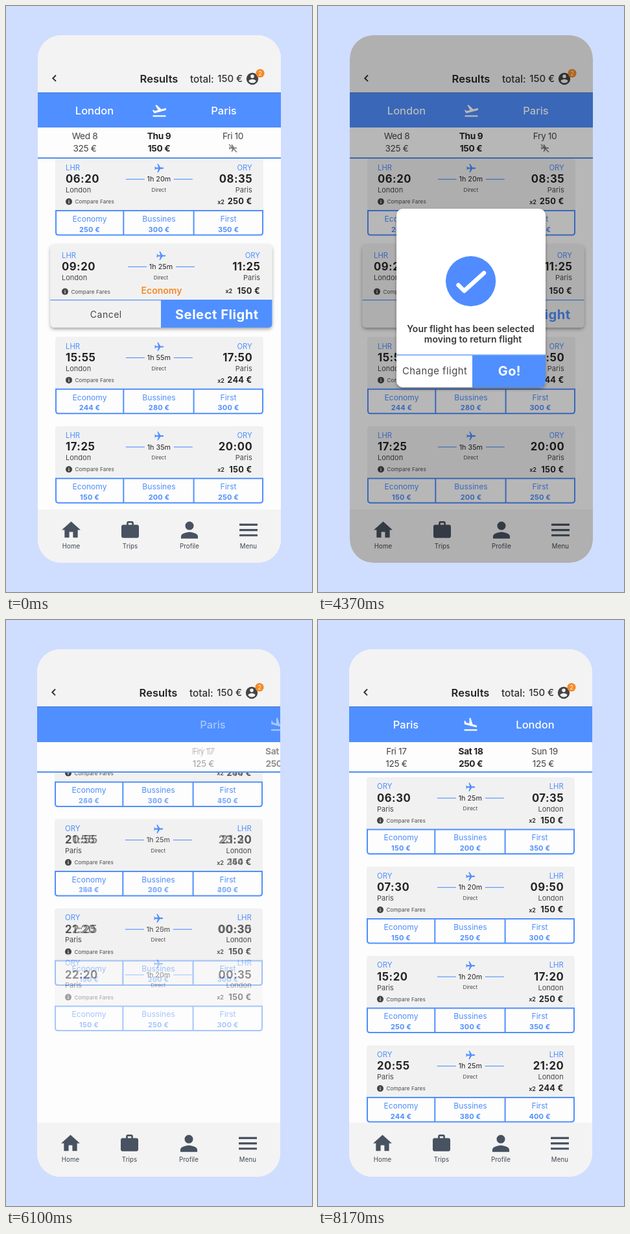
An HTML page for the animation above (8.63 s loop, 472 px wide and 902 px high).

```html
<!DOCTYPE html>
<html lang="en">
<head>
<meta charset="utf-8">
<title>Flight results</title>
<style>
  html, body { margin: 0; width: 100%; height: 100%; overflow: hidden; background: #cfddff; }
  svg { display: block; width: 100vw; height: 100vh; font-family: Inter, "Open Sans", sans-serif; }
  text { white-space: pre; }
</style>
</head>
<body>
<svg id="stage" viewBox="0 0 472 902" xmlns="http://www.w3.org/2000/svg"></svg>
<script>
const LOOP = 8630;
const BLUE = '#508fff', INK = '#242424', GREY = '#484848', ORANGE = '#f58a27', SLATE = '#485260';
const PANEL = '#f3f3f3', CARD = '#f1f1f1', PAPER = '#fdfdfd';

const ICON = {
  home: 'M10 20v-6h4v6h5v-8h3L12 3 2 12h3v8z',
  bag: 'M20 6h-4V4c0-1.11-.89-2-2-2h-4c-1.11 0-2 .89-2 2v2H4c-1.11 0-2 .89-2 2v11c0 1.11.89 2 2 2h16c1.11 0 2-.89 2-2V8c0-1.11-.89-2-2-2zm-6 0h-4V4h4v2z',
  person: 'M12 12a4 4 0 1 0 0-8 4 4 0 0 0 0 8zm0 2c-2.67 0-8 1.34-8 4v2h16v-2c0-2.66-5.33-4-8-4z',
  menu: 'M3 18.3h18v-2H3zm0-5.3h18v-2H3zm0-7.3v2h18v-2z',
  account: 'M12 2a10 10 0 1 0 0 20 10 10 0 0 0 0-20zm0 3a3 3 0 1 1 0 6 3 3 0 0 1 0-6zm0 14.2c-2.5 0-4.71-1.28-6-3.22.03-1.99 4-3.08 6-3.08s5.97 1.09 6 3.08c-1.29 1.94-3.5 3.22-6 3.22z',
  plane: 'M21 16v-2l-8-5V3.5a1.5 1.5 0 0 0-3 0V9l-8 5v2l8-2.5V19l-2 1.5V22l3.5-1 3.5 1v-1.5L13 19v-5.5z',
  takeoff: 'M2.5 19h19v2h-19zm19.57-9.36c-.21-.8-1.04-1.28-1.84-1.06L14.92 10l-6.9-6.43-1.93.51 4.14 7.17-4.97 1.33-1.97-1.54-1.45.39 2.59 4.49 1.6-.43L21 11.49c.81-.23 1.28-1.05 1.07-1.85z',
  landing: 'M2.5 19h19v2h-19zm7.18-5.73l9.66 2.58c.8.21 1.62-.26 1.84-1.06.21-.8-.26-1.62-1.06-1.84l-5.31-1.42-2.76-9.02L10.12 2v8.28L5.15 8.95l-.93-2.32-1.45-.39v5.17z'
};

// Text centred vertically on its capitals.
const text = (s, x, y, size, { a = 'start', w = 400, c = INK, ls = 0 } = {}) =>
  `<text x="${x}" y="${y + size * 0.364}" font-size="${size}" font-weight="${w}" fill="${c}" text-anchor="${a}" letter-spacing="${ls}">${s}</text>`;
const mid = (s, x, y, size, opt) => text(s, x, y, size, { ...opt, a: 'middle' });
const end = (s, x, y, size, opt) => text(s, x, y, size, { ...opt, a: 'end' });
const rect = (x, y, w, h, fill, more = '') => `<rect x="${x}" y="${y}" width="${w}" height="${h}" fill="${fill}" ${more}/>`;
const icon = (name, x, y, scale, fill, turn = 0) =>
  `<path d="${ICON[name]}" fill="${fill}" transform="translate(${x} ${y}) rotate(${turn}) scale(${scale}) translate(-12 -12)"/>`;
const group = (body, more = '') => `<g ${more}>${body}</g>`;

// A flight is [departure, arrival, duration, economy, business, first].
const HOME = ['LHR', 'London'], AWAY = ['ORY', 'Paris'];

function times([dep, arr, dur, price], left, right, low) {
  return text(dep, left, 31.5, 16.7, { w: 700, ls: .5 }) +
    end(arr, right + .5, 31.5, 16.7, { w: 700, ls: .5 }) +
    mid(dur, (left + right) / 2, 32, 10.8) +
    end(`${price} €`, right, low, 12.8, { w: 700, ls: .3 }) +
    text('x2', right - 53.5, low + .8, 9, { w: 600 });
}

function route(from, to, left, right, low) {
  const c = (left + right) / 2;
  return text(from[0], left, 14.3, 11.3, { c: BLUE }) +
    end(to[0], right, 14.3, 11.3, { c: BLUE }) +
    text(from[1], left, 48.5, 11, { c: GREY }) +
    end(to[1], right, 48.5, 11, { c: GREY }) +
    icon('plane', c + .3, 15.5, .7, BLUE, 90) +
    rect(c - 51, 31.6, 29, 1.1, BLUE) + rect(c + 23, 31.6, 29, 1.1, BLUE) +
    mid('Direct', c, 48.3, 8, { c: GREY }) +
    `<circle cx="${left + 5}" cy="${low + .6}" r="5" fill="#444"/>` +
    rect(left + 4.4, low, 1.2, 3.2, CARD) + rect(left + 4.4, low - 2, 1.2, 1.2, CARD) +
    text('Compare Fares', left + 14.5, low + .6, 8.2, { c: GREY, ls: .1 });
}

const fares = f => [128, 235, 342].map((x, i) =>
  mid(`${f[3 + i]} €`, x, 109, 11, { w: 700, c: BLUE, ls: .15 })).join('');

function card(y, from, to, flight, old, id = '') {
  const L = 91, R = 378.7;
  const values = f => times(f, L, R, 66.3) + fares(f);
  const names = ['Economy', 'Bussines', 'First'];
  return group(
    `<path d="M75 80V4q0-4 4-4H392q4 0 4 4V80z" fill="${CARD}"/>` + route(from, to, L, R, 66) +
    `<path d="M76 80.5H395V114q0 4-4 4H80q-4 0-4-4zM180.3 80.5V118M288.6 80.5V118" fill="${PAPER}" stroke="${BLUE}" stroke-width="2"/>` +
    names.map((n, i) => mid(n, [128, 235, 342][i], 93, 12.1, { c: BLUE })).join('') +
    (old ? group(values(old), 'class="old"') + group(values(flight), 'class="new"') : values(flight)),
    `${id} transform="translate(0 ${y})"`);
}

function selected(pressed) {
  return group(
    rect(67.5, 367, 342, 128, CARD, 'rx="6" filter="url(#shadow)"') +
    group(route(HOME, AWAY, 85, 391, 69.7) + times(['09:20', '11:25', '1h 25m', '150'], 85, 391, 69), 'transform="translate(0 369.3)"') +
    mid('Economy', 239, 437.8, 14, { w: 600, c: ORANGE }) +
    (pressed ? '' : `<path d="M238 453H409.5V489q0 6-6 6H238z" fill="${BLUE}"/>`) +
    rect(67.5, 452, 342, 1.2, BLUE) +
    mid('Cancel', 153.3, 475, 14, { c: GREY, ls: .5 }) +
    mid('Select Flight', 324.3, 475, 20.2, { w: 700, c: pressed ? BLUE : '#fff', ls: .5 }));
}

// Bars shared by both screens; edge and navY place the strips that differ.
function frame(list, strip, edge, navY) {
  const nav = [['home', 'Home', 1.45, 99.5], ['bag', 'Trips', 1.35, 190.5], ['person', 'Profile', 1.63, 282], ['menu', 'Menu', 1.55, 373]];
  return group(
    rect(48, 45, 375, 812, PAPER) +
    group(list, 'clip-path="url(#list)"') +
    rect(48, 45, 375, 89, PANEL) +
    `<path d="M76 106.5l-4.7 4.7 4.7 4.7" fill="none" stroke="#333" stroke-width="2"/>` +
    mid('Results', 235, 111.5, 16.5, { w: 600 }) +
    text('total:', 283, 112, 15.3, { w: 500, c: '#333' }) + text('150 €', 325.3, 112, 14.9, { w: 500, c: '#333' }) +
    icon('account', 379, 112, .92, '#444') +
    `<circle cx="391" cy="103.5" r="6.6" fill="${ORANGE}"/>` + mid('2', 391, 103.5, 8.5, { c: '#fff' }) +
    rect(48, 133, 375, edge - 133, BLUE) + rect(48, 133, 375, 1, '#4377cf') +
    rect(48, edge, 375, 47, PAPER) + rect(48, 233, 375, 2, '#5590ea') + strip +
    rect(48, navY, 375, 90, PANEL) +
    nav.map(([k, s, z, x]) => icon(k, x, navY + 31.6, z, SLATE) + mid(s, x, navY + 56.5, 9.7, { c: '#3d4651', ls: .1 })).join(''),
    'clip-path="url(#phone)"');
}

const cities = (a, b, mark) => mid(a, 135.5, 161, 16.5, { w: 500, c: '#fff' }) +
  icon(mark, 235.5, 161, 1.05, '#fff') + mid(b, 335, 161, 16.5, { w: 500, c: '#fff' });
const day = (name, price, x, y, w) => [name, price].map((s, i) =>
  s && mid(s, x, y + i * 19, 13.7, { w, c: w ? INK : '#444', ls: -.35 })).join('');

function outbound(pressed) {
  const rows = [
    [234.5, ['06:20', '08:35', '1h 20m', '250', '300', '350']],
    [509.3, ['15:55', '17:50', '1h 55m', '244', '280', '300']],
    [646.7, ['17:25', '20:00', '1h 35m', '150', '200', '250']]
  ];
  const strip = cities('London', 'Paris', 'takeoff') +
    day('Wed 8', '325 €', 120.5, 200.5) + day('Thu 9', '150 €', 235, 200.5, 700) +
    day(pressed ? 'Fry 10' : 'Fri 10', '', 349, 200.5) +
    icon('plane', 349, 219, .6, '#777', 90) +
    '<path d="M343 213l12 12" stroke="#777" stroke-width="1.4"/>';
  const list = rows.map(([y, f]) => card(y, HOME, AWAY, f)).join('') + selected(pressed);
  return group(frame(list, strip, 187, 775), 'transform="translate(1 0)"');
}

// Return flights: final values, then the values they dissolve from.
const RETURNS = [
  [['06:30', '07:35', '1h 25m', '150', '200', '350'], ['07:30', '09:50', '1h 20m', '150', '250', '300']],
  [['07:30', '09:50', '1h 20m', '150', '250', '300'], ['15:20', '17:20', '1h 20m', '250', '300', '350']],
  [['15:20', '17:20', '1h 20m', '250', '300', '350'], ['20:55', '21:20', '1h 25m', '244', '380', '450']],
  [['20:55', '21:20', '1h 25m', '244', '380', '400'], ['21:55', '23:30', '1h 25m', '150', '200', '250']],
  [['22:25', '00:30', '1h 25m', '150', '200', '350'], ['21:20', '00:35', '1h 20m', '150', '250', '300']],
  [['22:20', '00:35', '1h 20m', '150', '250', '300'], null]
];
const rowY = i => 242 + i * 137.5;

function inbound() {
  const list = RETURNS.map(([f, old], i) => card(rowY(i), AWAY, HOME, f, old, `id="row${i}"`)).join('');
  const strip = group(cities('Paris', 'London', 'landing') +
    group(day('Fry 17', '', 121, 202.3), 'class="old"') + group(day('Fri 17', '', 121, 202.3), 'class="new"') +
    day('', '125 €', 121, 202.3) +
    day('Sat 18', '250 €', 235.5, 202.3, 700) + day('Sun 19', '', 349.5, 202.3) + day('', '125 €', 347.5, 202.3), 'id="strip"');
  return frame(list, strip, 188, 774);
}

function popup() {
  return rect(121, 312, 230, 275, '#fff', 'rx="10" filter="url(#shadow)"') +
    '<circle id="disc" cx="235.6" cy="423.6"/>' +
    '<path id="tick" d="M216.5 429.5l9 9L256 411" pathLength="1" fill="none" stroke="#fff" stroke-width="6.5" stroke-linecap="round" stroke-linejoin="round"/>' +
    '<path id="sparks" fill="none" stroke="#f4bb35" stroke-width="1.9"/>' +
    mid('Your flight has been selected', 235.5, 496.5, 14, { w: 600, c: '#383838' }) +
    mid('moving to return flight', 239, 512.8, 14, { w: 600, c: '#383838' }) +
    `<path d="M238 538H351V577q0 10-10 10H238z" fill="${BLUE}"/>` + rect(121, 536.5, 230, 1.3, BLUE) +
    mid('Change flight', 180.2, 562, 14.8, { c: GREY, ls: .5 }) +
    mid('Go!', 295.3, 562, 20, { w: 700, c: '#fff', ls: .3 });
}

const stage = document.getElementById('stage');
stage.innerHTML = `<defs>
  <clipPath id="phone"><rect x="48" y="45" width="375" height="812" rx="36"/></clipPath>
  <clipPath id="list"><rect x="48" y="234" width="375" height="541"/></clipPath>
  <clipPath id="view"><rect x="48" y="44" width="376" height="814"/></clipPath>
  <filter id="shadow" x="-10%" y="-10%" width="120%" height="125%"><feDropShadow dx="0" dy="2.5" stdDeviation="2.5" flood-opacity=".35"/></filter>
</defs>` + rect(0, 0, 472, 902, '#cfddff') +
  group(
    group(outbound(false), 'id="first"') +
    group(outbound(true) + rect(49, 45, 375, 812, '#000', 'rx="36" opacity=".28"') + popup(), 'id="dialog"') +
    group(inbound(), 'id="second"'), 'clip-path="url(#view)"');

const $ = id => document.getElementById(id);
const olds = stage.querySelectorAll('.old'), news = stage.querySelectorAll('.new');
const set = (el, k, v) => el.setAttribute(k, v);
const span = (t, from, dur) => Math.min(1, Math.max(0, (t - from) / dur));
const mix = (a, b, p) => a + (b - a) * p;

// cubic-bezier(.42, 0, .58, 1)
function ease(x) {
  let lo = 0, hi = 1, s = .5;
  for (let i = 0; i < 22; i++) {
    s = (lo + hi) / 2;
    const bx = 3 * (1 - s) ** 2 * s * .42 + 3 * (1 - s) * s * s * .58 + s ** 3;
    if (bx < x) lo = s; else hi = s;
  }
  return x <= 0 ? 0 : x >= 1 ? 1 : s * s * (3 - 2 * s);
}

// Bursts: [x, y, start, rays]
const BURSTS = [[193, 417, 50, 6], [268, 405, 190, 8], [208, 385, 610, 8], [261, 462, 550, 8]];

function badge(t) {
  const k = ((t - 600) % 2030 + 2030) % 2030;
  const grow = ease(span(k, 0, 300)), fill = ease(span(k, 450, 200)), fade = 1 - span(k, 1900, 130);
  set($('disc'), 'r', mix(43 * grow, 38.6, fill));
  set($('disc'), 'fill', `rgb(${mix(207, 80, fill)},${mix(223, 140, fill)},${mix(252, 255, fill)})`);
  set($('disc'), 'opacity', fade);
  const draw = span(k, 680, 210);
  set($('tick'), 'stroke-dasharray', `${draw} 2`);
  set($('tick'), 'opacity', draw > 0 ? fade : 0);
  let d = '';
  for (const [x, y, start, rays] of BURSTS) {
    const u = (k - start) / 400;
    if (u <= 0 || u >= 1) continue;
    const r0 = 12 * u, r1 = Math.min(13, 7 + 8 * u);
    for (let i = 0; i < rays; i++) {
      const a = (i + .5) * 2 * Math.PI / rays, c = Math.cos(a), s = Math.sin(a);
      d += `M${x + r0 * c} ${y + r0 * s}L${x + r1 * c} ${y + r1 * s}`;
    }
  }
  set($('sparks'), 'd', d);
}

function render(t) {
  const fade = ease(span(t, 720, 800)), slide = ease(span(t, 4592, 800)), p = ease(span(t, 5701, 800));
  set($('dialog'), 'opacity', fade);
  set($('dialog'), 'display', slide < 1 && fade > 0 ? 'inline' : 'none');
  set($('first'), 'display', fade < 1 ? 'inline' : 'none');
  set($('second'), 'display', slide > 0 ? 'inline' : 'none');
  set($('second'), 'transform', `translate(${376 * (1 - slide)} 0)`);
  set($('strip'), 'transform', `translate(${367 * (1 - p)} 0)`);
  set($('strip'), 'opacity', p);
  RETURNS.forEach((_, i) => set($('row' + i), 'transform', `translate(0 ${rowY(i) - (i < 5 ? 696 : 831) * (1 - p)})`));
  set($('row5'), 'opacity', p);
  olds.forEach(el => set(el, 'opacity', 1 - p));
  news.forEach(el => set(el, 'opacity', p));
  badge(t);
}

const begin = performance.now();
function tick() {
  render((performance.now() - begin) % LOOP);
  requestAnimationFrame(tick);
}
tick();
</script>
</body>
</html>
```
